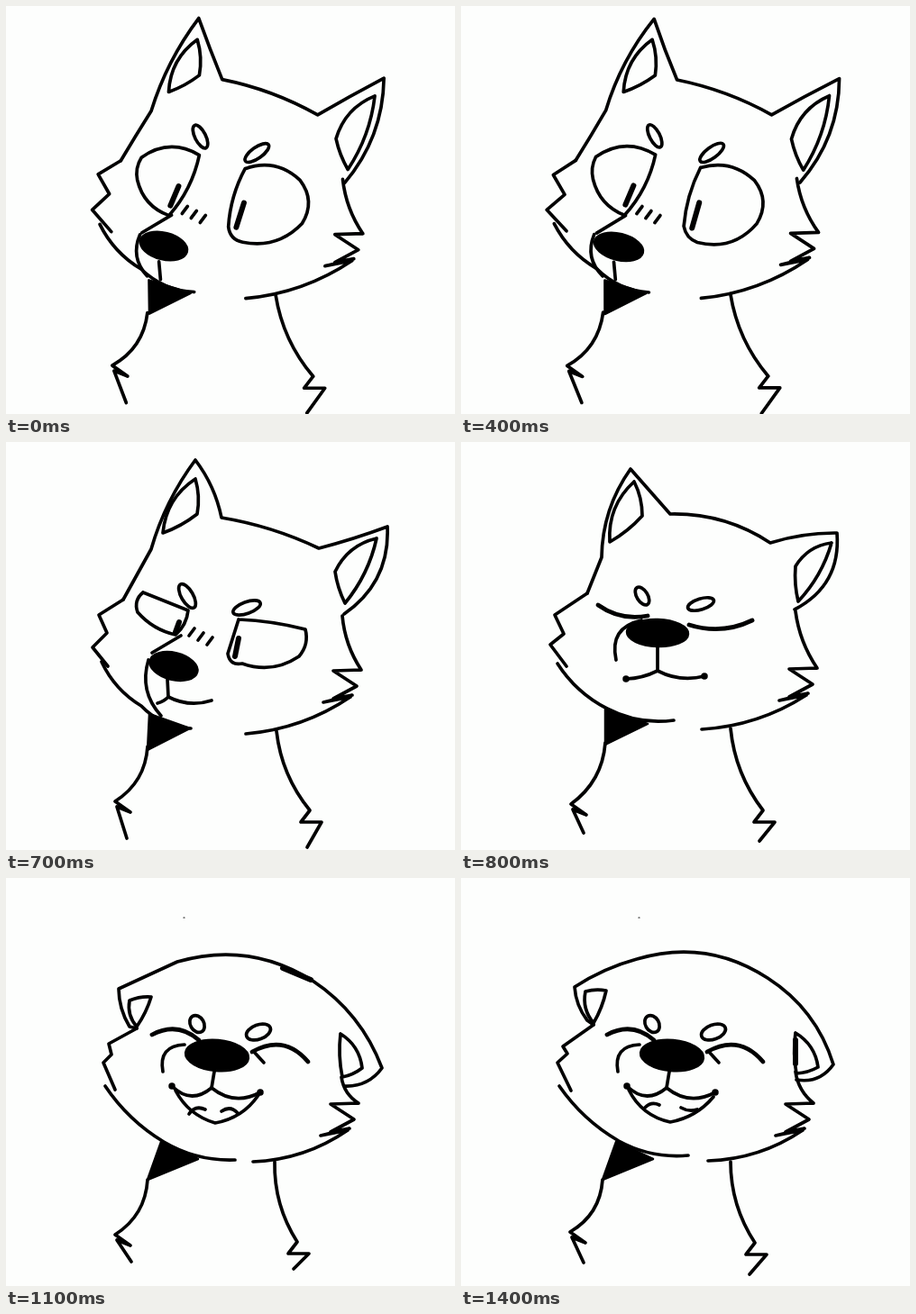
Animation of 498x453 px, one loop 1.5 s. Source, as an HTML page:

```html
<!DOCTYPE html>
<html lang="en">
<head>
<meta charset="utf-8">
<title>Smiling wolf</title>
<style>
  html, body { margin: 0; width: 100%; height: 100%; overflow: hidden; background: #fdfefd; }
  svg { display: block; width: 498px; height: 453px; }
  path, ellipse { fill: none; stroke: #000; stroke-width: 3.7; stroke-linecap: round; stroke-linejoin: round; }
  .solid { fill: #000; stroke-width: 2.5; }
  .lid { stroke-width: 4.8; }
  .heavy { stroke-width: 6; }
  .speck { stroke-width: 1.2; }
  g { visibility: hidden; animation: show 1500ms step-end infinite; }
  @keyframes show { 0% { visibility: visible; } 6.6667%, 100% { visibility: hidden; } }
</style>
</head>
<body>
<svg id="stage" viewBox="0 0 498 453"></svg>
<script>
// Key points of each pose. Head, eyes, lids, mouth and jaw list x, y, bulge, x, y, ...
// Ovals are x, y, radius, radius, angle.
const wide = {
  head: [128, 172, 0, 161, 116, 5, 214, 14, 0, 240, 82, 4, 345, 121, 0, 419, 80, 11, 376, 196],
  ears: [[212, 37, 180, 96, 215, 77], [409, 100, 366, 147, 379, 182]],
  furL: [102, 187, 115, 209, 95, 226, 117, 250],
  chin: [104, 242, 150, 292, 209, 318],
  cheekR: [373, 192, 0, 0, 266, 324],
  brows: [[215, 145, 14, 5.5, 63], [278, 163, 16, 6.5, -36]],
  eyes: [
    [150, 168, 11, 215, 165, 5, 181, 233, 7, 146, 193, 2],
    [265, 180, 9, 326, 194, 8, 328, 241, 10, 262, 262, 4, 247, 245, 3]
  ],
  pupils: [[192, 200, 182, 221], [264, 218, 256, 246]],
  blush: [201, 223],
  nose: [175, 267, 27, 15, 14],
  bridge: [183, 232, 150, 252],
  muzzle: [148, 254, -8, 157, 300],
  philtrum: [170, 284, 171, 304],
  patch: [159, 304, 205, 319, 159, 342],
  bodyL: [157, 340, 118, 399, 134, 440],
  bodyR: [299, 320, 341, 411, 334, 452]
};

const squint = {
  head: [130, 175, 0, 161, 119, 5, 210, 20, 4, 239, 84, 4, 347, 118, -1, 423, 94, 15, 375, 191],
  ears: [[210, 41, 174, 101, 212, 80], [411, 107, 365, 144, 376, 179]],
  furL: [103, 192, 112, 212, 96, 228, 113, 249],
  chin: [106, 244, 150, 293, 205, 318],
  cheekR: [373, 193, -2, 1, 266, 324],
  brows: [[201, 171, 15, 6.5, 60], [267, 184, 16, 6.5, -20]],
  eyes: [
    [152, 167, 0, 202, 187, 3, 188, 214, 4, 146, 189, 4],
    [258, 197, 2, 332, 208, 4, 325, 238, 8, 262, 246, 5, 246, 235, 0]
  ],
  pupils: [[192, 200, 188, 211], [258, 218, 254, 238]],
  blush: [209, 207],
  nose: [186, 249, 27, 15, 14],
  bridge: [194, 215, 162, 234],
  muzzle: [158, 242, -9, 172, 304],
  philtrum: [179, 263, 180, 283],
  mouth: [168, 290, -1, 180, 283, -5, 228, 287],
  patch: [159, 302, 204, 318, 157, 342],
  bodyL: [157, 338, 121, 399, 134, 440],
  bodyR: [300, 321, 337, 409, 334, 450]
};

const calm = {
  head: [140, 168, 0, 156, 128, 8, 188, 30, 0, 232, 80, 9, 343, 112, 3, 417, 101, 16, 370, 186],
  ears: [[192, 44, 165, 111, 201, 82], [411, 112, 371, 138, 374, 177]],
  furL: [104, 192, 114, 213, 99, 225, 117, 249],
  chin: [107, 246, 162, 296, 236, 309],
  cheekR: [371, 188, -1, -1, 267, 319],
  brows: [[201, 171, 11, 6, 58], [266, 180, 15, 6, -17]],
  lids: [[152, 181, -6, 207, 193], [253, 203, -7, 323, 198]],
  nose: [218, 212, 34, 15, 2],
  muzzle: [200, 198, -13, 172, 242],
  philtrum: [218, 228, 218, 254],
  mouth: [183, 263, -2, 218, 254, -5, 270, 260],
  dimples: true,
  patch: [160, 297, 207, 313, 160, 336],
  bodyL: [160, 334, 122, 402, 136, 434],
  bodyR: [299, 318, 335, 409, 331, 443]
};

const grin = {
  head: [145, 167, 0, 137, 165, 3, 125, 123, 0, 190, 93, 17, 340, 114, 10, 417, 211, 6, 376, 231],
  ears: [[137, 136, 145, 165, 161, 132], [395, 211, 371, 173, 373, 221]],
  furL: [114, 184, 117, 196, 108, 205, 121, 235],
  chin: [110, 231, 175, 293, 254, 313],
  cheekR: [372, 221, -5, -2, 274, 315],
  brows: [[212, 162, 10, 7.5, 60], [280, 171, 14, 8, -20]],
  lids: [[162, 174, 9, 214, 180], [273, 193, 13, 335, 204]],
  nose: [234, 197, 35, 17, 5],
  muzzle: [198, 185, -11, 174, 215],
  crease: [275, 193, 286, 205],
  philtrum: [231, 215, 228, 233],
  mouth: [184, 231, -10, 228, 233, -9, 282, 238],
  dimples: true,
  jaw: [188, 236, -6, 232, 272, -6, 280, 241],
  tongue: [[203, 262, 4, 221, 257], [239, 259, 4, 257, 261]],
  patch: [172, 293, 213, 312, 157, 335],
  bodyL: [157, 335, 121, 396, 139, 426],
  bodyR: [298, 315, 323, 404, 319, 434],
  heavy: [307, 100, 338, 113],
  speck: [197, 44, 198, 44]
};

const laugh = {
  ...grin,
  head: [147, 163, 0, 140, 158, 3, 126, 121, 3, 195, 90, 17, 340, 111, 11, 413, 207, 7, 372, 224],
  ears: [[138, 126, 147, 161, 161, 125], [396, 210, 371, 172, 372, 217]],
  furL: [113, 187, 118, 195, 107, 205, 122, 236],
  chin: [109, 231, 175, 292, 252, 308],
  cheekR: [371, 215, -5, -2, 274, 314],
  jaw: [186, 235, -7, 232, 271, -5, 280, 243],
  tongue: [[204, 255, 3, 220, 252], [244, 255, -2, 262, 257]],
  bodyL: [157, 335, 121, 393, 136, 427],
  bodyR: [299, 315, 326, 405, 320, 440],
  heavy: [371, 180, 371, 206]
};

const furR = [396, 252, 365, 253, 391, 270, 365, 284, 386, 280, 354, 288, 384, 282];

const shift = (pts, x, y) => pts.map((v, i) => v + (i % 2 ? y : x));
const line = pts => "M" + pts.join(" ");

// Each segment bulges to the left of its direction; a trailing bulge closes the shape.
function curve(s) {
  let d = `M${s[0]} ${s[1]}`;
  for (let i = 0; i + 2 < s.length; i += 3) {
    const [x, y, bulge, u = s[0], v = s[1]] = s.slice(i, i + 5);
    const k = 2 * bulge / (Math.hypot(u - x, v - y) || 1);
    d += `Q${(x + u) / 2 + (v - y) * k} ${(y + v) / 2 - (u - x) * k} ${u} ${v}`;
  }
  return d;
}

function leaf([ax, ay, bx, by, cx, cy]) {
  return curve([
    ax, ay, -0.12 * Math.hypot(bx - ax, by - ay),
    bx, by, -0.04 * Math.hypot(cx - bx, cy - by),
    cx, cy, -0.06 * Math.hypot(ax - cx, ay - cy)
  ]);
}

function cheek([x, y, dx, dy, endX, endY]) {
  const fur = shift(furR, dx, dy);
  return curve([x, y, -4, fur[0], fur[1]]) + line(fur) + curve([...fur.slice(-2), 8, endX, endY]);
}

// A side of the body: a bowed flank, then a ragged tuft.
const flank = ([x, y, footX, footY, endX, endY], bulge, tuft) =>
  curve([x, y, bulge, footX, footY]) + line([footX, footY, ...shift(tuft, footX, footY), endX, endY]);

function wolf(p) {
  let art = "";
  const pen = (d, cls = "") => art += `<path class="${cls}" d="${d}"/>`;
  const oval = ([x, y, rx, ry, a], cls = "") => art +=
    `<ellipse class="${cls}" cx="${x}" cy="${y}" rx="${rx}" ry="${ry}" transform="rotate(${a} ${x} ${y})"/>`;

  pen(curve(p.head));
  p.ears.forEach(e => pen(leaf(e)));
  pen(line([p.head[0], p.head[1], ...p.furL]));
  const [x, y, midX, midY, endX, endY] = p.chin;
  pen(curve([x, y, -5, midX, midY, -6, endX, endY]));
  pen(cheek(p.cheekR));
  pen(flank(p.bodyL, 9, [17, 12, 2, 6]));
  pen(flank(p.bodyR, -7, [-10, 13, 13, 13]));
  pen(line(p.patch) + "Z", "solid");

  p.brows.forEach(b => oval(b));
  p.eyes?.forEach(e => pen(curve(e)));
  p.pupils?.forEach(l => pen(line(l), "heavy"));
  p.lids?.forEach(l => pen(curve(l), "lid"));
  if (p.blush) for (let i = 0; i < 3; i++) {
    const [bx, by] = shift(p.blush, i * 10, i * 5);
    pen(line([bx, by, bx - 6, by + 8]));
  }

  oval(p.nose, "solid");
  pen(curve(p.muzzle));
  for (const key of ["bridge", "philtrum", "crease"]) if (p[key]) pen(line(p[key]));
  for (const key of ["mouth", "jaw"]) if (p[key]) pen(curve(p[key]));
  p.tongue?.forEach(t => pen(curve(t)));
  if (p.dimples) for (const i of [0, 6]) oval([p.mouth[i], p.mouth[i + 1], 2.5, 2.5, 0], "solid");
  if (p.heavy) pen(line(p.heavy), "heavy");
  if (p.speck) pen(line(p.speck), "speck");
  return art;
}

// Blends two poses; parts found in only one follow the nearer pose.
function mix(a, b, t) {
  if (typeof a === "number" && typeof b === "number") return a + (b - a) * t;
  if (Array.isArray(a) && Array.isArray(b)) return a.map((v, i) => mix(v, b[i], t));
  const near = t < 0.5 ? a : b;
  if (!a || !b || typeof a !== "object") return near;
  return Object.fromEntries(Object.keys(near).map(k => [k, mix(a[k], b[k], t)]));
}

// Redraws a pose with a slightly unsteady hand.
function redraw(pose, seed) {
  const random = () => (seed = (seed * 16807) % 2147483647) / 2147483647;
  const shake = v => Array.isArray(v) ? v.map(shake) : v + (random() - 0.5) * 1.4;
  return Object.fromEntries(Object.entries(pose).map(([k, v]) => [k, shake(v)]));
}

const hands = [71, 502, 913].map(seed => redraw(wide, seed));
const poses = [
  ...hands, ...hands,
  mix(wide, squint, 0.7), squint, calm,
  mix(calm, grin, 0.5), mix(calm, grin, 0.9), grin,
  laugh, { ...laugh, jaw: grin.jaw, tongue: grin.tongue }, laugh
];

document.getElementById("stage").innerHTML = poses.map((pose, i) =>
  `<g style="animation-delay:${(i - poses.length) * 100}ms">${wolf(pose)}</g>`
).join("");
</script>
</body>
</html>
```
